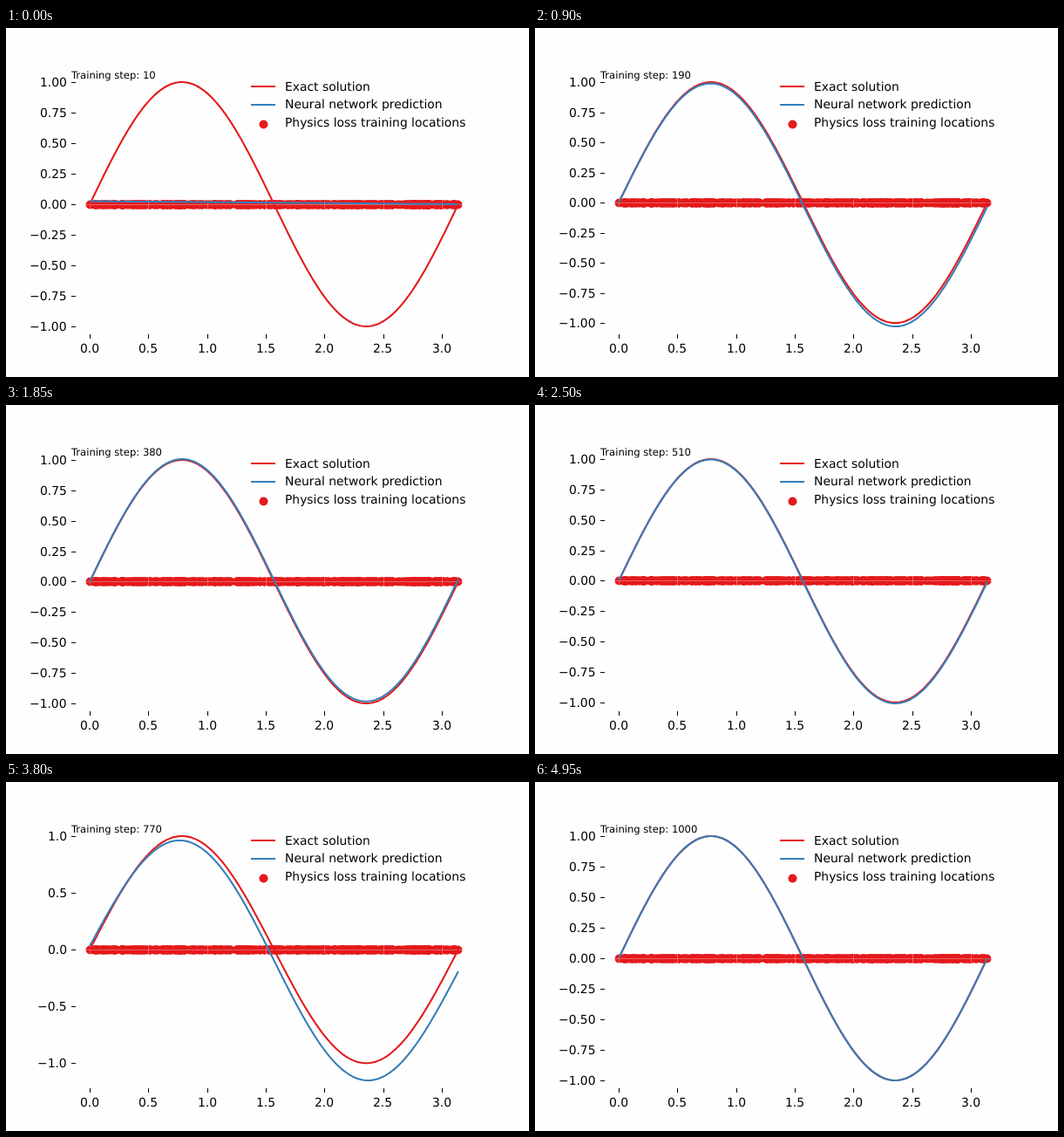
These frames come from a looping animation (600 by 400 pixels, 5000 ms). An HTML page with a canvas:

```html
<!DOCTYPE html>
<html lang="en">
<head>
<meta charset="utf-8">
<title>Training progress</title>
<style>
  html, body { margin: 0; width: 100%; height: 100%; overflow: hidden; background: #fefefe; }
  canvas { display: block; }
</style>
</head>
<body>
<canvas id="plot" width="600" height="400"></canvas>
<script>
const ctx = document.getElementById('plot').getContext('2d');
const RED = '#e41a1c', BLUE = '#377eb8', GRID = 'rgba(255,255,255,.3)';
const LEFT = 75, RIGHT = 540, BOTTOM = 356, TOP = 62, HEIGHT = 280;
const SAMPLES = 240, FRAME_MS = 50, FRAMES = 100;

let seed = 7;
const random = () => (seed = seed * 16807 % 2147483647) / 2147483647;
const points = [0, Math.PI];
while (points.length < 400) points.push(.04 + random() * 3.09);

const xs = Array.from({ length: SAMPLES + 1 }, (_, i) => Math.PI * i / SAMPLES);
const exact = xs.map(x => Math.sin(2 * x));
const px = x => 96.136 + x * 422.727 / Math.PI;

const bell = (step, center, width) => Math.exp(-(((step - center) / width) ** 2));
const smooth = t => t * t * (3 - 2 * t);

// Fast fit, then a fading wobble with one sudden spike
function predict(step) {
  const growth = smooth(Math.min(1, (step - 10) / 70));
  const early = bell(step, 80, 30);
  const spike = -.193 * bell(step, 770, 20);
  const wobble = -.052 * growth * (1 - step / 1000) ** 2
    * Math.cos((step - 190) * 7 / 380 * 2 * Math.PI);
  const tilt = wobble + spike;
  const start = .025 * (1 - growth) - .035 * early - .17 * spike;
  const end = tilt + .028 * early;
  const bump = .1 * tilt + .081 * early;
  return xs.map(x => growth * Math.sin(2 * x) + start + (end - start) * x / Math.PI
    + bump * (Math.sin(x) + .15 * Math.sin(3 * x)));
}

// anchor: 0 left, .5 centre, 1 right
function text(str, x, y, anchor = 0, size = 13.889) {
  ctx.font = `${size}px "DejaVu Sans", sans-serif`;
  ctx.textRendering = 'geometricPrecision';
  ctx.fillStyle = '#000';
  ctx.fillText(str, Math.round(x - anchor * ctx.measureText(str).width), y);
}

function line(coords, color, width = 2.08) {
  ctx.beginPath();
  coords.forEach(([x, y]) => ctx.lineTo(x, y));
  ctx.strokeStyle = color;
  ctx.lineWidth = width;
  ctx.stroke();
}

function dot(x, y) {
  ctx.beginPath();
  ctx.arc(Math.floor(x) + .5, y + .5, 5, 0, 7);
  ctx.fillStyle = RED;
  ctx.fill();
}

function tickMark(x, y, w, h) {
  ctx.fillStyle = '#000';
  ctx.fillRect(x, y, w, h);
}

function drawLegend() {
  line([[281, 67], [309, 67]], RED, 2);
  line([[281, 88], [309, 88]], BLUE, 2);
  dot(295, 110);
  text('Exact solution', 320, 72);
  text('Neural network prediction', 320, 92);
  text('Physics loss training locations', 320, 113);
}

function draw(step) {
  const predicted = predict(step);
  const max = Math.max(1, ...predicted), min = Math.min(-1, ...predicted);
  const range = max - min;
  const py = v => TOP + (max - v) * HEIGHT / range;
  const curve = values => values.map((v, i) => [px(xs[i]), py(v)]);

  ctx.fillStyle = '#fefefe';
  ctx.fillRect(0, 0, 600, 400);

  const zero = Math.round(py(0));
  points.forEach(x => dot(px(x), zero));
  line([[LEFT, zero + .5], [RIGHT, zero + .5]], GRID, 1);

  for (let x = 0; x <= 3; x += .5) {
    const col = Math.round(px(x));
    line([[col + .5, 48], [col + .5, BOTTOM]], GRID, 1);
    tickMark(col, BOTTOM - 5, 1, 5);
    text(x.toFixed(1), px(x), 372, .5);
  }

  // A wider view gets sparser ticks
  const [gap, digits] = range * 1.1 > 2.25 ? [.5, 1] : [.25, 2];
  for (let v = -1; v <= 1; v += gap) {
    const y = Math.round(py(v));
    tickMark(LEFT, y, 5, 1);
    text((v < 0 ? '\u2212' : '') + Math.abs(v).toFixed(digits), 70, y + 5, 1);
  }

  line(curve(exact), RED);
  line(curve(predicted), BLUE);
  drawLegend();
  text('Training step: ' + step, LEFT, 58, 0, 11.574);
}

const begin = performance.now();
function tick() {
  const frame = Math.floor((performance.now() - begin) / FRAME_MS) % FRAMES;
  draw(10 * (frame + 1));
  requestAnimationFrame(tick);
}
tick();
</script>
</body>
</html>
```
